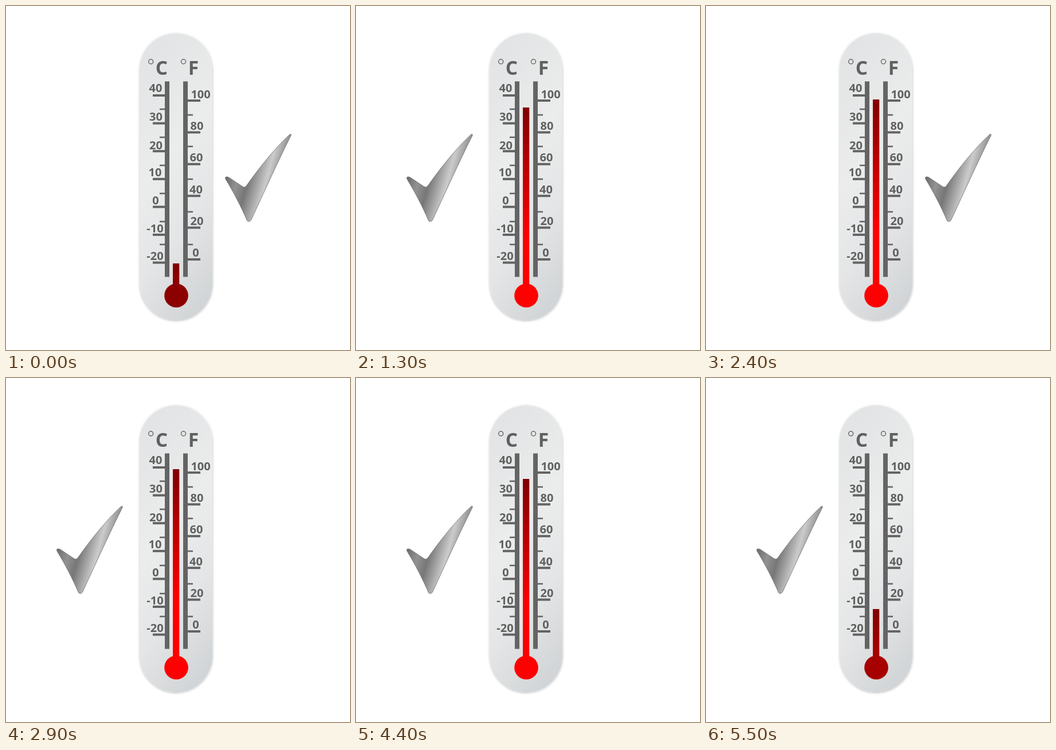
Write an HTML page that moves like this. It is 600 px wide and 600 px high and loops after 5.6 s.

```html
<!DOCTYPE html>
<html lang="en">
<head>
<meta charset="utf-8">
<title>Thermometer</title>
<style>
  html, body { margin: 0; width: 100%; height: 100%; overflow: hidden; background: #fff; }
  svg { display: block; width: 100vw; height: 100vh; }
  text { font-family: "Open Sans", "Noto Sans", sans-serif; font-weight: 700; fill: #606060; text-anchor: middle; }
  .label { font-size: 20px; }
  .unit { font-size: 33.5px; }
  .scale { fill: #646464; }
  .degree { fill: none; stroke: #6a6a6a; stroke-width: 1.5; }
</style>
</head>
<body>
<svg viewBox="0 0 600 600">
  <defs>
    <linearGradient id="plate" x1="0.35" y1="0" x2="0.65" y2="1">
      <stop offset="0" stop-color="#e2e4e5"/>
      <stop offset="0.4" stop-color="#ebecec"/>
      <stop offset="0.7" stop-color="#e4e5e6"/>
      <stop offset="1" stop-color="#d2d5d7"/>
    </linearGradient>
    <linearGradient id="metal" gradientUnits="userSpaceOnUse" x1="384" y1="288" x2="494" y2="318">
      <stop offset="0" stop-color="#686868"/>
      <stop offset="0.2" stop-color="#929292"/>
      <stop offset="0.36" stop-color="#777"/>
      <stop offset="0.5" stop-color="#a2a2a2"/>
      <stop offset="0.63" stop-color="#cbcbcb"/>
      <stop offset="0.78" stop-color="#999"/>
      <stop offset="1" stop-color="#696969"/>
    </linearGradient>
    <filter id="shadow" x="-10%" y="-5%" width="120%" height="110%">
      <feDropShadow dx="0" dy="1" stdDeviation="2" flood-color="#000" flood-opacity="0.28"/>
    </filter>
    <clipPath id="tubeShape"><rect x="291" y="126" width="11.5" height="380" rx="5.75"/></clipPath>
  </defs>
  <rect x="233.5" y="48" width="126.5" height="500" rx="63.25" fill="url(#plate)" filter="url(#shadow)"/>
  <circle class="degree" cx="252.7" cy="97" r="4"/>
  <circle class="degree" cx="309.5" cy="97" r="4"/>
  <text class="unit" x="271.5" y="119.5">C</text>
  <text class="unit" x="327" y="119.5">F</text>
  <rect class="scale" x="277" y="131.5" width="8" height="341"/>
  <rect class="scale" x="309" y="131.5" width="8" height="341"/>
  <g id="marks"></g>
  <g id="tube" clip-path="url(#tubeShape)"></g>
  <circle id="bulb" cx="297" cy="505" r="20.8"/>
  <path id="check" fill="url(#metal)" stroke="#707070" stroke-width="0.8"
    d="M382.5 299 Q384 297 388 298.5 L412 314.5 Q416 317.5 419 314 C440 284 468 249 495 223.8 Q498 222.5 497 226
       C474 272 450 325 427.5 373.5 Q424 378 420.5 374.5 C410 350 397 325 383 302 Z"/>
</svg>
<script>
const FRAME = 100, FRAMES = 56, BAND = 16, TUBE_END = 492;
const svgNS = "http://www.w3.org/2000/svg";
const byId = id => document.getElementById(id);

function add(parent, tag, attributes, content = "") {
  const node = document.createElementNS(svgNS, tag);
  for (const key in attributes) node.setAttribute(key, attributes[key]);
  node.textContent = content;
  return parent.appendChild(node);
}

const marks = byId("marks");
const tick = (x, y, width, height) =>
  add(marks, "rect", { class: "scale", x, y: y - height / 2, width, height });
const label = (x, y, value) => add(marks, "text", { class: "label", x, y }, value);

const celsiusX = [261, 261.5, 261.5, 260, 261, 260, 260];
const celsiusY = [150, 199.5, 250, 297, 346, 395, 443];
celsiusX.forEach((x, i) => {
  tick(256, 156 + 48.6 * i, 21, 4);
  label(x, celsiusY[i], 40 - 10 * i);
});
[180, 229, 278, 327, 376, 416].forEach(y => tick(268, y, 9, 2.6));

const fahrenheitX = [339.5, 333, 332, 331.5, 333, 331];
fahrenheitX.forEach((x, i) => {
  tick(317, 165 + 55.4 * i, 22, 4);
  label(x, 161 + 55.2 * i, 100 - 20 * i);
});
[190, 245, 302, 359, 416].forEach(y => tick(317, y, 9, 2.6));

// Height of the liquid as [frame, y] turning points, linear in between.
const levels = [
  [0, 449], [6, 162], [7, 126], [13, 177], [18, 142], [20, 126], [24, 163], [27, 194], [30, 142],
  [35, 158], [39, 126], [42, 139], [45, 194], [48, 150], [50, 167], [54, 356], [56, 449]
];

function levelAt(frame) {
  const next = levels.findIndex(([f]) => f > frame);
  const [f0, y0] = levels[next - 1], [f1, y1] = levels[next];
  return y0 + (y1 - y0) * (frame - f0) / (f1 - f0);
}

const red = depth => `rgb(${Math.round(Math.min(255, 127 + 0.575 * Math.max(0, depth)))},0,0)`;

const tube = byId("tube");
const bands = Array.from({ length: Math.ceil((TUBE_END - 126) / BAND) }, () =>
  add(tube, "rect", { x: 291, width: 11.5 }));

function draw(frame) {
  const top = Math.round(levelAt(frame));
  const bulbDepth = 471 - top;
  bands.forEach((band, i) => {
    const y = top + i * BAND;
    band.setAttribute("y", y);
    band.setAttribute("height", Math.max(0, Math.min(BAND + 0.5, TUBE_END - y)));
    band.setAttribute("fill", red(Math.min((i + 0.5) * BAND, bulbDepth)));
  });
  byId("bulb").setAttribute("fill", red(bulbDepth));
  const onLeft = Math.floor(frame / 4) % 2 === 1;
  byId("check").setAttribute("transform", `translate(${onLeft ? -294 : 0} 0)`);
}

const start = performance.now();
function play() {
  draw(Math.floor((performance.now() - start) / FRAME) % FRAMES);
  requestAnimationFrame(play);
}
play();
</script>
</body>
</html>
```
